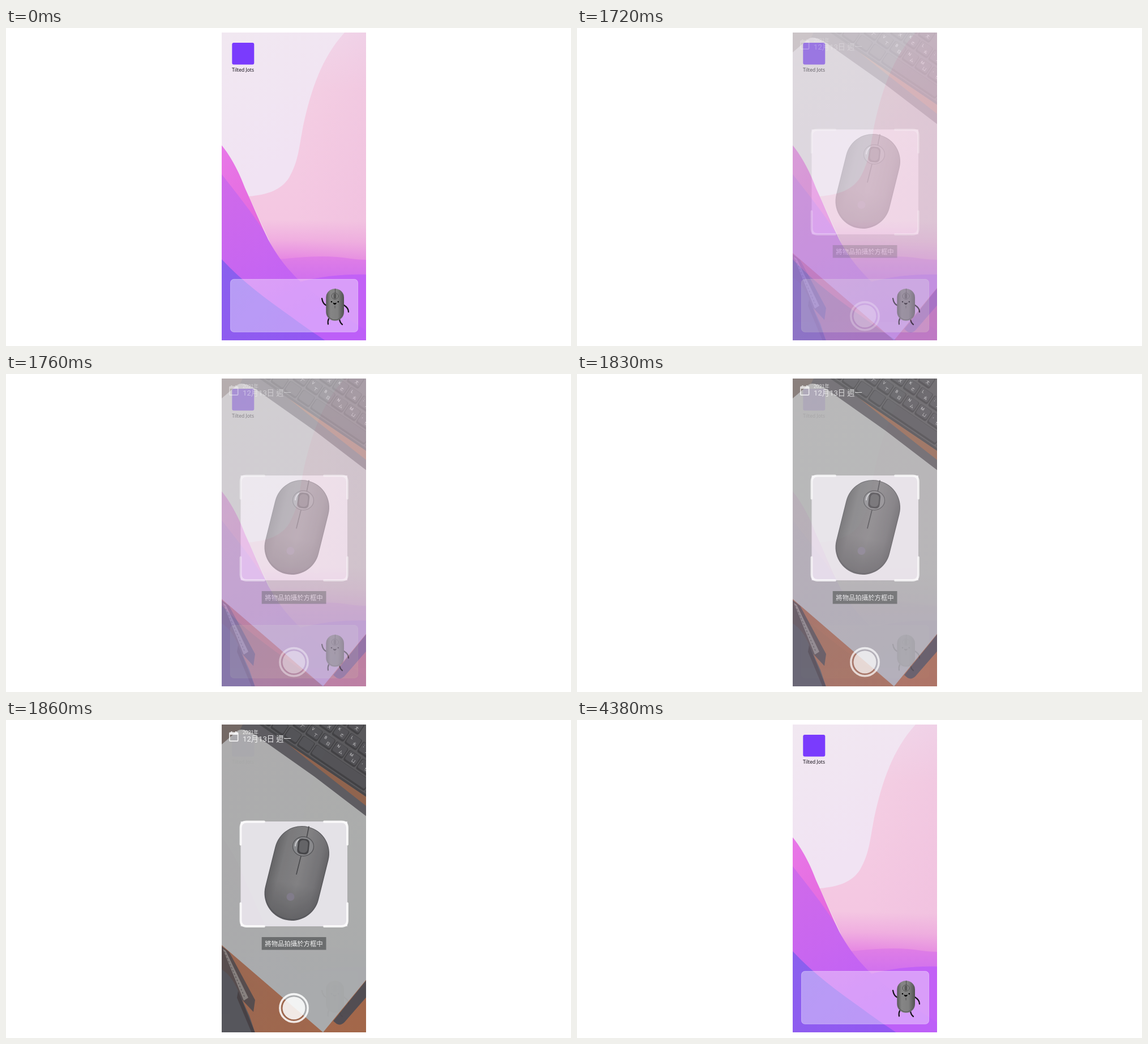
Recreate the animation shown at these times as an HTML page. Size 998x561 px, loop 6860 ms.

```html
<!DOCTYPE html>
<html lang="zh-Hant">
<head>
<meta charset="utf-8">
<title>Camera note</title>
<style>
  html, body { margin: 0; width: 100%; height: 100%; overflow: hidden; background: #fff; }
  svg { display: block; width: 998px; height: 561px; }
  text { font-family: Roboto, "Noto Sans CJK TC", "Noto Sans CJK", sans-serif; fill: #fff; }
  .app { font: 8.5px "Noto Sans", sans-serif; fill: #15101a; text-anchor: middle; }
  .line { fill: none; stroke-linecap: round; stroke-linejoin: round; }
  .camera { opacity: 0; }
</style>
</head>
<body>
<svg viewBox="0 0 998 561">
  <defs>
    <clipPath id="phone"><rect x="381" y="8.8" width="255" height="542.2"/></clipPath>
    <linearGradient id="sky" x1="0" y1="0" x2=".3" y2="1">
      <stop offset="0" stop-color="#f1e8f1"/><stop offset=".5" stop-color="#f1e3f3"/>
    </linearGradient>
    <linearGradient id="pink" gradientUnits="userSpaceOnUse" x1="560" y1="8" x2="550" y2="412">
      <stop offset="0" stop-color="#f2d9ea"/><stop offset=".25" stop-color="#f4cfe3"/>
      <stop offset=".6" stop-color="#f4cae2"/><stop offset=".82" stop-color="#f4c7e2"/>
      <stop offset=".91" stop-color="#f0aee0"/><stop offset="1" stop-color="#e584e3"/>
    </linearGradient>
    <linearGradient id="shade" x1="0" x2="1">
      <stop offset=".4" stop-color="#e6aed8" stop-opacity="0"/>
      <stop offset="1" stop-color="#e6aed8" stop-opacity=".2"/>
    </linearGradient>
    <linearGradient id="band" x1="0" y1="0" x2="0" y2="1">
      <stop offset="0" stop-color="#df7ee6"/><stop offset="1" stop-color="#c868f2"/>
    </linearGradient>
    <linearGradient id="sliver" x1="0" y1="0" x2=".5" y2="1">
      <stop offset="0" stop-color="#e878e8"/><stop offset="1" stop-color="#e468dc"/>
    </linearGradient>
    <linearGradient id="hill" gradientUnits="userSpaceOnUse" x1="385" y1="270" x2="520" y2="520">
      <stop offset="0" stop-color="#cf6aea"/><stop offset=".5" stop-color="#c866f0"/>
      <stop offset="1" stop-color="#bd5ff8"/>
    </linearGradient>
    <linearGradient id="blue" gradientUnits="userSpaceOnUse" x1="385" y1="420" x2="530" y2="551">
      <stop offset="0" stop-color="#8a60ee"/><stop offset="1" stop-color="#9358f2"/>
    </linearGradient>
    <linearGradient id="toy" x1="0" x2="1">
      <stop offset="0" stop-color="#585858"/><stop offset=".25" stop-color="#858585"/>
      <stop offset=".65" stop-color="#808080"/><stop offset="1" stop-color="#505050"/>
    </linearGradient>
    <linearGradient id="wood" gradientUnits="userSpaceOnUse" x1="381" y1="400" x2="636" y2="551">
      <stop offset="0" stop-color="#8c5338"/><stop offset="1" stop-color="#96522c"/>
    </linearGradient>
    <linearGradient id="paper" x1="0" y1="0" x2=".3" y2="1">
      <stop offset="0" stop-color="#a0a0a0"/><stop offset="1" stop-color="#9da1a0"/>
    </linearGradient>
    <linearGradient id="shell" gradientUnits="userSpaceOnUse" x1="466" y1="257" x2="562" y2="281">
      <stop offset="0" stop-color="#4a4a4c"/><stop offset=".2" stop-color="#656567"/>
      <stop offset=".55" stop-color="#6e6e70"/><stop offset=".85" stop-color="#5e5e61"/>
      <stop offset="1" stop-color="#4b4b4e"/>
    </linearGradient>
    <linearGradient id="bottom" gradientUnits="userSpaceOnUse" x1="514" y1="290" x2="500" y2="354">
      <stop offset="0" stop-color="#3f4043" stop-opacity="0"/><stop offset="1" stop-color="#3f4043" stop-opacity=".75"/>
    </linearGradient>
    <filter id="soft" x="-30%" y="-30%" width="160%" height="160%"><feGaussianBlur stdDeviation="4"/></filter>
  </defs>

  <g clip-path="url(#phone)">
    <g class="home">
      <rect x="381" y="8" width="256" height="544" fill="url(#sky)"/>
      <path id="dune" fill="url(#pink)" d="M598 8C558 52 539 108 525 172C517 215 516 236 500 264C486 286 462 294 429 297L490 430H638V8Z"/>
      <path fill="url(#shade)" d="M598 8C558 52 539 108 525 172C517 215 516 236 500 264C486 286 462 294 429 297L490 430H638V8Z"/>
      <path fill="url(#band)" d="M470 409C510 406 545 401 585 404C605 406 620 409 638 409V470H490Z"/>
      <path fill="#c261f6" d="M515 449C560 437 600 434 638 435V552H515Z"/>
      <path fill="url(#sliver)" d="M381 207C397 226 413 257 422 282C436 312 448 342 462 371L450 400L381 300Z"/>
      <path fill="url(#hill)" d="M381 258C407 291 434 325 456 359C476 400 496 425 525 452C560 482 600 511 638 535V552H381Z"/>
      <path fill="url(#blue)" d="M381 408C418 448 461 479 506 511Q534 532 565 552H381Z"/>
    </g>
    <rect class="home" x="396.5" y="443.3" width="225" height="93" rx="6" fill="#fff" fill-opacity=".38" stroke="#fff" stroke-opacity=".35"/>
    <g class="home">
      <rect x="399.3" y="26" width="39" height="38.5" rx="3" fill="#7a3bfd"/>
      <text class="app" x="418.5" y="77">Tilted Jots</text>
    </g>
    <g class="home">
      <path class="line" stroke="#17131a" stroke-width="2.2" d="M565 489C561 487 559 483 558 477M597 489C602 492 605 496 605 501M570 513Q568 517 569 522.5M589 514Q590 520 594 523"/>
      <rect x="565.3" y="460" width="31.7" height="56.5" rx="15.5" fill="url(#toy)"/>
      <path class="line" stroke="#606060" stroke-width="1.5" d="M567 503C571 519 591 519 595 503"/>
      <path class="line" stroke="#444" stroke-width=".8" d="M581.5 460V468M581 490V494"/>
      <ellipse cx="581" cy="473" rx="5.8" ry="5.5" fill="#8a8a8a" stroke="#444" stroke-width=".8"/>
      <rect x="578.5" y="468.5" width="5" height="9" rx="2" fill="#585858"/>
      <circle cx="575" cy="483" r="1.3"/><circle cx="586.8" cy="483" r="1.3"/>
      <path d="M577.5 484.5Q581 486 584 484.5Q583 488 580.7 488Q578.5 488 577.5 484.5Z"/>
    </g>

    <g class="camera">
      <rect x="381" y="8" width="256" height="544" fill="url(#wood)"/>
      <path fill="#5e524d" d="M381 8H440L405 40L381 52Z"/>
      <path fill="#7f4c33" d="M455 8H638V175L520 80Z"/>
      <path fill="#454348" d="M418 8H455L545 80L638 153V175L540 112L412 20Z"/>
      <path fill="url(#paper)" d="M381 43L409 19Q418 13 440 26L545 100L638 171V456L560 551L381 397Z"/>

      <g transform="translate(543 22) rotate(34)">
        <rect x="-170" y="-130" width="380" height="172" rx="5" fill="#404043"/>
        <path stroke="#2b2b2e" stroke-width="4" d="M-150 40H200"/>
        <g id="keys"></g>
      </g>

      <path fill="#3f3432" d="M381 399L394 409L440 494L437 515L381 455Z"/>
      <path fill="#77706b" d="M383 404L388 407L428 490L420 495Z"/>
      <path class="line" stroke="#4a4542" stroke-width="1.5" stroke-dasharray="2 4" d="M386 409L422 490"/>
      <path fill="#3d3e42" d="M381 440Q399 451 410 478L430 522L440 552H381Z"/>
      <path fill="#2c2627" d="M410 478L440 552H434L408 490Z"/>
      <path fill="#373437" d="M638 457V487L598 533Q591 540 584 536L578 531Z"/>

      <rect x="414.5" y="179" width="188.5" height="185" fill="#e1dfe4"/>
      <g class="line">
        <path stroke="#aaa7ad" stroke-width="94" filter="url(#soft)" opacity=".6" d="M524 240L506 310"/>
        <path stroke="#404145" stroke-width="97" d="M522.5 235.5L505 305.5"/>
        <path stroke="url(#shell)" stroke-width="94" d="M522.5 235L505.5 303.5"/>
        <path stroke="url(#bottom)" stroke-width="94" d="M522.5 235L505.5 303.5"/>
        <path stroke="#2b2c2f" stroke-width="1.6" d="M535 188L531 208M521.5 238L513 272"/>
      </g>
      <ellipse cx="525" cy="223" rx="18.5" ry="17" fill="#77787b" stroke="#3a3b3e" stroke-width="1.3"/>
      <path class="line" stroke="#c6c6c9" stroke-width="2" d="M511 222Q512 214 517 211"/>
      <rect x="515" y="209.5" width="20.5" height="27.5" rx="7" fill="#292a2d" transform="rotate(6 525 223)"/>
      <rect x="518" y="212" width="15" height="22" rx="6" fill="#4b4c4f" transform="rotate(6 525 223)"/>
      <circle cx="502.5" cy="312" r="7" fill="#6d6878"/>
    </g>

    <path class="camera line" stroke="#fff" stroke-width="3.8" d="M414.5 219.5V190Q414.5 179.5 425 179.5H456M562 179.5H592.5Q603 179.5 603 190V219.5M603 323.5V353.5Q603 364 592.5 364H562M456 364H425Q414.5 364 414.5 353.5V323.5"/>
    <g class="camera">
      <path fill="#fff" fill-rule="evenodd" d="M396 21.5H397.5V20H399.5V21.5H405V20H407V21.5H408.5Q410.5 21.5 410.5 23.5V36Q410.5 38 408.5 38H396Q394 38 394 36V23.5Q394 21.5 396 21.5ZM395.7 26V36.3H408.8V26Z"/>
      <text x="418" y="25" font-size="8.6">2021年</text>
      <text x="418" y="38.3" font-size="13.2">12月13日 週一</text>
    </g>
    <g class="camera">
      <rect x="451.7" y="383" width="113.8" height="22.5" fill="#616364"/>
      <text x="508.5" y="398.7" font-size="11.4" text-anchor="middle">將物品拍攝於方框中</text>
    </g>
    <g class="camera">
      <circle cx="508.5" cy="508.2" r="24.6" fill="none" stroke="#fff" stroke-width="3.6"/>
      <circle cx="508.5" cy="508.2" r="20" fill="#fff"/>
    </g>
  </g>
</svg>
<script>
const LOOP = 6860;
// [time in ms, progress of the cross-fade], each value held until the next
const STEPS = [
  [0, 0], [1690, .1], [1720, .26], [1760, .42], [1790, .57],
  [1830, .72], [1860, .86], [1900, 1], [4380, 0], [LOOP, 0]
];

const keys = document.getElementById('keys');

function add(tag, attrs, text = '') {
  const el = document.createElementNS('http://www.w3.org/2000/svg', tag);
  for (const name in attrs) el.setAttribute(name, attrs[name]);
  el.textContent = text;
  keys.append(el);
}

function key(x, y, w, label = '') {
  add('rect', { x, y, width: w, height: 22, rx: 3.5, fill: '#242427' });
  add('rect', { x: x + 1.5, y: y + .5, width: w - 3, height: 18, rx: 3, fill: '#39393d' });
  [...label].forEach((c, i) =>
    add('text', { x: x + 5 + i * 8, y: y + 8.5 + i * 7, 'font-size': 7, 'fill-opacity': .75 }, c));
}

const rows = [
  [-92, -62, ['Gㄕ', 'Hㄘ', 'Jㄨ', 'Kㄜ', 'Lㄠ', ';ㄤ']],
  [-80, -37, ['Fㄑ', 'Gㄕ', 'Hㄘ', 'Jㄨ', 'Kㄜ', 'Lㄠ', ';ㄤ']],
  [-92, -11, ['Zㄈ', 'Xㄌ', 'Cㄏ', 'Vㄒ', 'Bㄖ', 'Nㄙ', 'Mㄩ', ',ㄝ']]
];
for (const [x, y, labels] of rows)
  labels.forEach((label, i) => key(x + i * 27, y, 25, label));
[-96, -68, -40, -12].forEach(x => key(x, 14, 26));
key(16, 14, 116);
key(134, 14, 30);

// Every piece fades on its own, so overlapping pieces show through each other.
const start = document.timeline.currentTime;
function fade(group, opacity) {
  const frames = STEPS.map(([t, p]) => ({ offset: t / LOOP, opacity: opacity(p), easing: 'step-end' }));
  for (const el of document.querySelectorAll(group))
    el.animate(frames, { duration: LOOP, iterations: Infinity }).startTime = start;
}
fade('.home', p => 1 - p);
fade('.camera', p => p);
</script>
</body>
</html>
```
